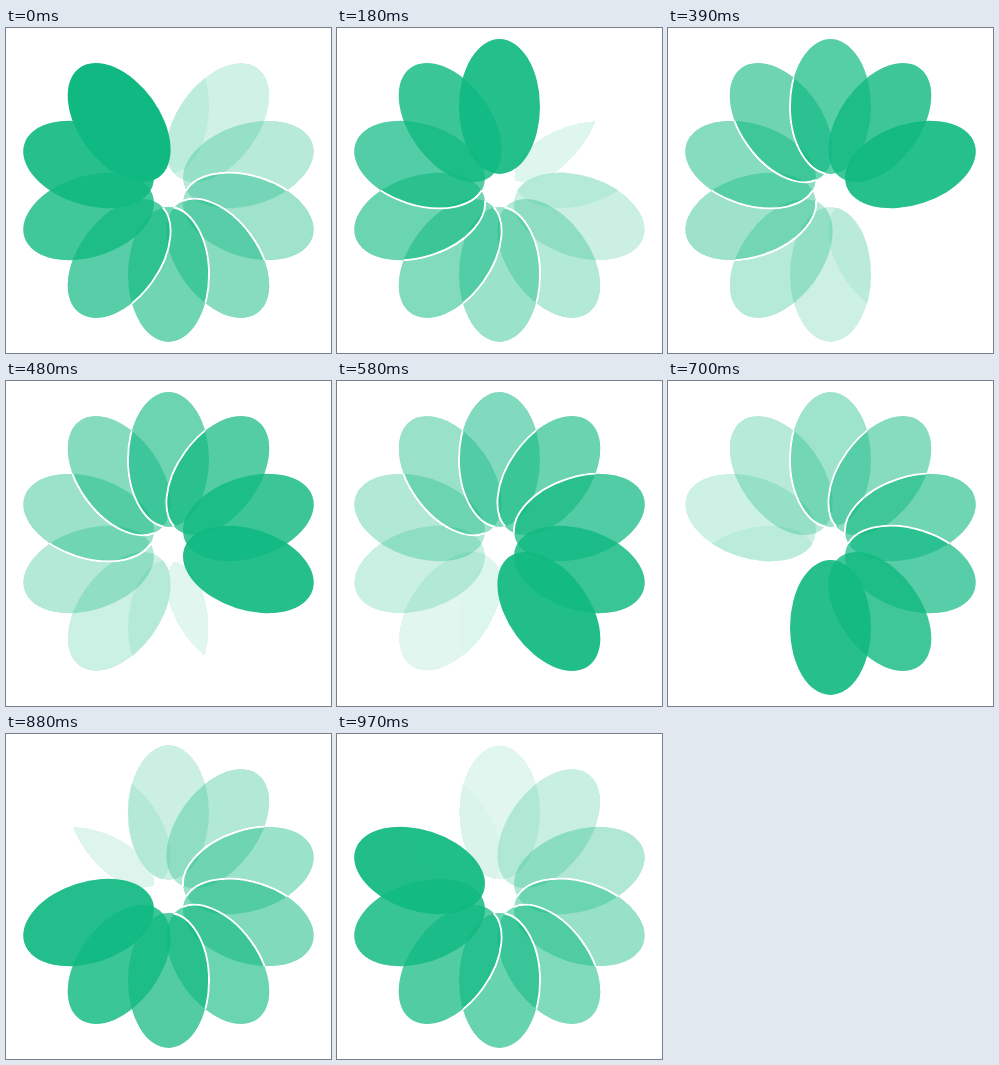
Recreate the animation shown at these times as an HTML page with a canvas. Size 325 by 325 pixels, loop 1 s.

```html
<!DOCTYPE html>
<html lang="en">
<head>
<meta charset="utf-8">
<title>Petal spinner</title>
<style>
  html, body { margin: 0; width: 100%; height: 100%; overflow: hidden; background: #fff; }
  canvas { display: block; }
</style>
</head>
<body>
<canvas id="stage" width="325" height="325"></canvas>
<script>
const SIZE = 325, MID = SIZE / 2;
const PETALS = 10, STEPS = 33, LOOP = 1000;
const RX = 40.5, RY = 67.5, REACH = 84;
const COLOR = [16, 185, 129];
const MIN_ALPHA = 32; // fainter pixels stay white

const ctx = document.getElementById('stage').getContext('2d', { willReadFrequently: true });

const petals = Array.from({ length: PETALS }, (_, i) => {
  const turn = i * 2 * Math.PI / PETALS;
  const path = new Path2D();
  path.ellipse(MID + REACH * Math.sin(turn), MID - REACH * Math.cos(turn), RX, RY, turn, 0, 2 * Math.PI);
  return path;
});

// Each petal fades from 1 to 0, one tenth of a loop after the one before it.
function fade(i, step) {
  const tenths = PETALS * step / STEPS + PETALS - 1 - i;
  return 1 - (tenths % PETALS) / PETALS;
}

function fillPetal(i, alpha) {
  if (alpha < 0.015) return;
  ctx.globalAlpha = Math.min(1, (Math.round(alpha * 255) + 0.1) / 255);
  ctx.fill(petals[i]);
}

// Thin gap along the edge of a half-faded petal where it crosses its neighbour.
function cutEdge(i, alpha) {
  if (alpha < 0.36 || alpha > 0.77) return;
  ctx.save();
  ctx.clip(petals[(i + PETALS - 1) % PETALS]);
  ctx.globalCompositeOperation = 'destination-out';
  ctx.globalAlpha = 1;
  ctx.lineWidth = 1.8;
  ctx.stroke(petals[i]);
  ctx.restore();
}

function flatten() {
  const img = ctx.getImageData(0, 0, SIZE, SIZE), px = img.data;
  for (let p = 0; p < px.length; p += 4) {
    const a = px[p + 3] < MIN_ALPHA ? 0 : px[p + 3] / 255;
    for (let c = 0; c < 3; c++) px[p + c] = 255 + (COLOR[c] - 255) * a;
    px[p + 3] = 255;
  }
  ctx.putImageData(img, 0, 0);
}

function draw(step) {
  const alphas = petals.map((_, i) => fade(i, step));
  ctx.clearRect(0, 0, SIZE, SIZE);
  ctx.fillStyle = `rgb(${COLOR})`;
  alphas.forEach((a, i) => fillPetal(i, a));
  alphas.forEach((a, i) => cutEdge(i, a));
  flatten();
}

let start = null, shown = -1;
function tick(now) {
  if (start === null) start = now;
  const ms = Math.max(0, now - start) % LOOP;
  // 33 steps whose starts are rounded to 10 ms
  const step = Math.floor((Math.floor(ms / 10) + 0.5) * STEPS / 100);
  if (step !== shown) draw(shown = step);
  requestAnimationFrame(tick);
}
draw(shown = 0);
requestAnimationFrame(tick);
</script>
</body>
</html>
```
